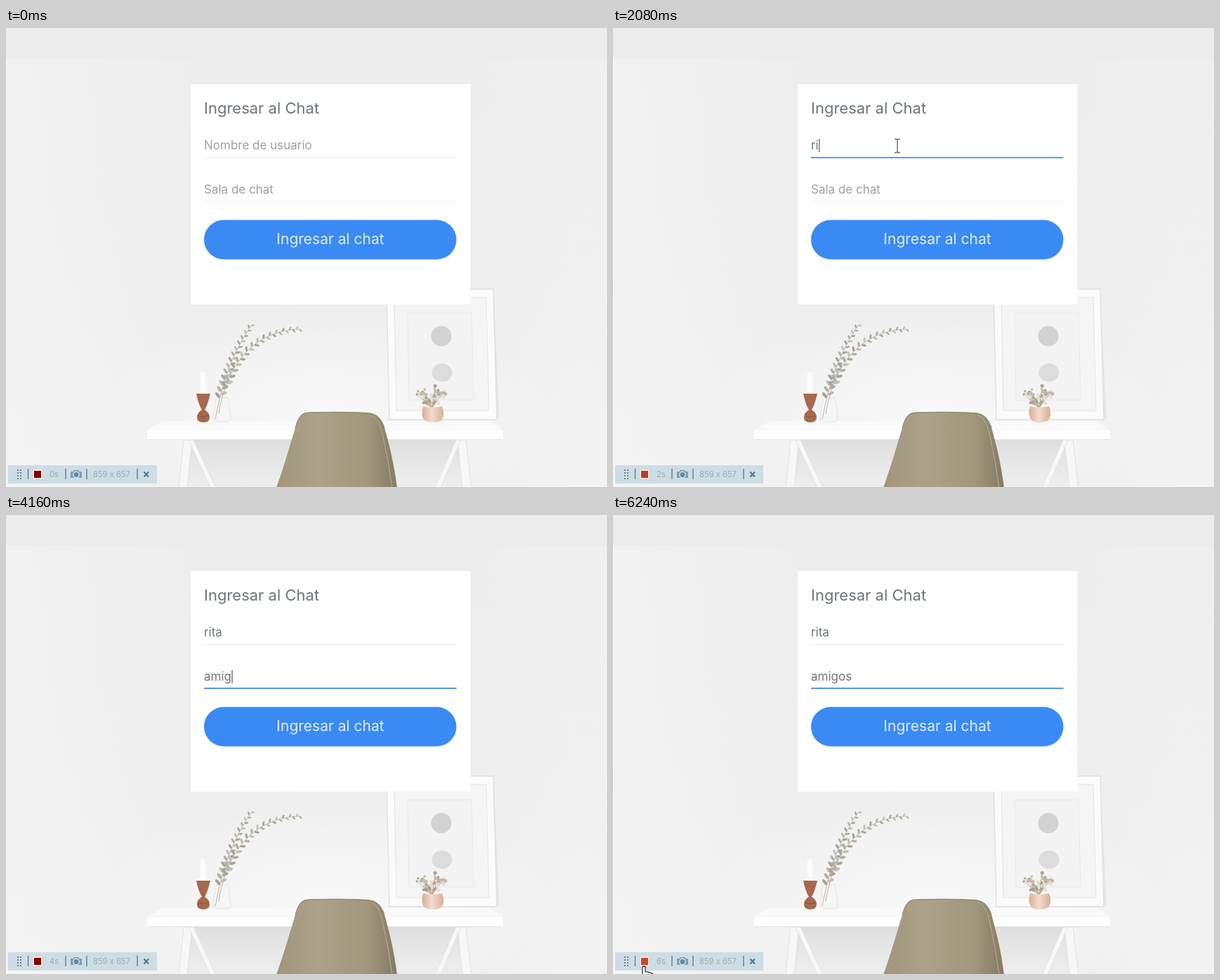
These frames come from a looping animation (856x654 px, 6.37 s). An HTML page:

```html
<!DOCTYPE html>
<html lang="es">
<head>
<meta charset="utf-8">
<title>Ingresar al Chat</title>
<style>
  html, body { margin: 0; width: 100%; height: 100%; overflow: hidden; background: #ededed; }
  svg { display: block; width: 856px; height: 654px; }
  text { font-family: Inter, "Open Sans", sans-serif; white-space: pre; }
  .field { font-size: 17px; }
  .tool { font-size: 11.2px; fill: #9eabb3; }
</style>
</head>
<body>
<svg viewBox="0 0 856 654">
  <defs>
    <linearGradient id="wall" x1="0" y1="0" x2="0" y2="1">
      <stop offset="0" stop-color="#ededed"/>
      <stop offset=".5" stop-color="#eeeeee"/>
      <stop offset="1" stop-color="#f1f1f1"/>
    </linearGradient>
    <linearGradient id="shade">
      <stop offset="0" stop-color="#fff" stop-opacity=".25"/>
      <stop offset=".35" stop-color="#ebebeb" stop-opacity=".3"/>
      <stop offset=".8" stop-color="#ededed" stop-opacity=".3"/>
      <stop offset="1" stop-color="#fff" stop-opacity=".1"/>
    </linearGradient>
    <radialGradient id="glow">
      <stop offset="0" stop-color="#fff" stop-opacity=".6"/>
      <stop offset=".5" stop-color="#fff" stop-opacity=".35"/>
      <stop offset="1" stop-color="#fff" stop-opacity="0"/>
    </radialGradient>
    <linearGradient id="under" x1="0" y1="0" x2="0" y2="1">
      <stop offset="0" stop-color="#dedede"/>
      <stop offset=".5" stop-color="#e7e7e7"/>
      <stop offset="1" stop-color="#eeeeee"/>
    </linearGradient>
    <linearGradient id="seat">
      <stop offset="0" stop-color="#a0967c"/>
      <stop offset=".35" stop-color="#aba289"/>
      <stop offset=".75" stop-color="#a1977d"/>
      <stop offset="1" stop-color="#857b63"/>
    </linearGradient>
    <linearGradient id="copper">
      <stop offset="0" stop-color="#dcae94"/>
      <stop offset=".45" stop-color="#f2dccd"/>
      <stop offset="1" stop-color="#d9ae97"/>
    </linearGradient>
  </defs>

  <rect width="856" height="654" fill="#ececec"/>
  <rect y="44" width="856" height="610" fill="url(#wall)"/>
  <rect y="44" width="856" height="610" fill="url(#shade)"/>
  <ellipse cx="455" cy="550" rx="330" ry="150" fill="url(#glow)"/>

  <!-- framed print -->
  <path d="M694 372L703 556H699Z" fill="#e6e6e6"/>
  <path d="M542 372H694L699 558H546Z" fill="#fbfbfb" stroke="#e0e0e0" stroke-width="1.3"/>
  <path d="M553 384H684L688 545H556Z" fill="#f5f5f5" stroke="#e4e4e4"/>
  <path d="M572 406H663L666 530H574Z" fill="#f3f3f3" stroke="#e8e8e8"/>
  <circle cx="620" cy="439" r="14.5" fill="#d2d2d2"/>
  <ellipse cx="621" cy="491" rx="14.5" ry="13" fill="#dcdcdc"/>

  <!-- desk -->
  <path d="M253 586H655L663 655H246Z" fill="url(#under)"/>
  <g fill="#f7f7f7" stroke="#dcdcdc" stroke-width=".7">
    <path d="M253 587H265L258 655H246Z"/>
    <path d="M260 587H267L299 655H291Z"/>
    <path d="M643 587H655L663 655H650Z"/>
    <path d="M648 587H641L611 655H619Z"/>
  </g>
  <path d="M224 560H688L708 572H201Z" fill="#fafafa"/>
  <path d="M201 572H708V585L701 587H206L201 585Z" fill="#fefefe"/>
  <path d="M203 586.5H706" stroke="#e2e2e2"/>
  <path d="M201 572H708" stroke="#f1f1f1"/>

  <!-- plants, candle and pots -->
  <path d="M299 527H316L320 556Q320 561 314 561H300Q294 561 295 555Z" fill="#f6f6f6" stroke="#e3e3e3"/>
  <g id="plants"></g>
  <path d="M277 492Q280 487 284 492V521H277Z" fill="#fdfcfa"/>
  <path d="M271 521H291Q287 538 283 544Q290 548 290 555Q290 562 281 562Q272 562 272 555Q272 548 279 544Q274 536 271 521Z" fill="#a5694f"/>
  <path d="M274 552Q281 556 288 552" fill="none" stroke="#85503d"/>
  <path d="M594 539Q608 542 621 539Q625 549 622 556Q619 562 608 562Q597 562 594 556Q591 548 594 539Z" fill="url(#copper)"/>

  <!-- chair -->
  <path d="M385 655C397 622 405 592 412 570C416 555 420 548 432 547.5Q474 546 514 548C528 549 534 556 539 569C546 594 553 622 557 655Z" fill="url(#seat)"/>
  <path d="M412 570C416 555 420 548 432 548Q474 546.5 514 548.5C528 549 534 556 539 569" fill="none" stroke="#8b826b"/>
  <path d="M519 552C529 555 533 564 537 582Q545 618 550 655" fill="none" stroke="#b8b099" stroke-width="1"/>

  <!-- form -->
  <rect x="263" y="80" width="398.500" height="314" fill="#fff"/>
  <text x="282" y="122" font-size="22" fill="#6c757b">Ingresar al Chat</text>
  <path d="M282 184.500H641.500M282 247H641.500" stroke="#ececec"/>
  <g id="fields"></g>
  <rect id="caret" width="1.200" height="19" fill="#4f5a60"/>
  <rect x="283" y="275.500" width="358" height="55" rx="27.500" fill="#cfe2f9"/>
  <rect x="282" y="273.500" width="359.500" height="56" rx="28" fill="#3a8af4"/>
  <text x="462" y="308" font-size="21" fill="#e2edfd" text-anchor="middle">Ingresar al chat</text>

  <!-- recorder bar -->
  <rect id="bar" x="3" y="623" height="26" fill="#cddde4"/>
  <path d="M17 629V643M21 629V643" stroke="#688396" stroke-width="2" stroke-dasharray="2 2"/>
  <path d="M31.500 628V643" stroke="#5e7382" stroke-width="1.300"/>
  <rect x="37.500" y="628.500" width="15" height="15" fill="#efe9e4" stroke="#d8cfca"/>
  <rect id="record" x="40" y="631" width="10" height="10"/>
  <text id="seconds" class="tool" x="62" y="640"></text>
  <g id="tools">
    <path d="M85 628V643M115 628V643M187 628V643" stroke="#5e7382" stroke-width="1.300"/>
    <path d="M92 632H95.500L97 630H103L104.500 632H108V641H92Z" fill="#7d9db5"/>
    <circle cx="100" cy="636.500" r="4.200" fill="#6288a6" stroke="#d5e3e9" stroke-width="1.500"/>
    <text class="tool" x="124" y="640">859 x 657</text>
    <path d="M196.500 632.500L203 639.500M203 632.500L196.500 639.500" stroke="#52799b" stroke-width="2.300"/>
  </g>

  <g id="cursor">
    <path id="beam" d="M-4-9.500H-1L0-8.500L1-9.500H4M0-8.500V8.500M-4 9.500H-1L0 8.500L1 9.500H4" fill="none" stroke="#666" stroke-width="1.300"/>
    <path id="arrow" d="M0 0V18L4.200 14L7.500 21L10.500 19.700L7.200 13H13Z" fill="#111" stroke="#fff"/>
    <path id="hand" d="M-2 1Q0-1 2 1V8H4Q6 7 7 9Q9 8 10 10Q12 9 13 12V18L10 24H0L-6 14Q-6 11-2 14Z" fill="#fff" stroke="#222" stroke-width="1.200"/>
  </g>
</svg>
<script>
const LOOP = 6370, STEP = 130;
const $ = id => document.getElementById(id);
const add = (parent, tag, attrs) => {
  const el = document.createElementNS('http://www.w3.org/2000/svg', tag);
  for (const key in attrs) el.setAttribute(key, attrs[key]);
  return parent.appendChild(el);
};
const set = (id, attrs) => { for (const key in attrs) $(id).setAttribute(key, attrs[key]); };
const show = (id, on) => $(id).setAttribute('visibility', on ? 'visible' : 'hidden');
const clamp = v => Math.max(0, Math.min(1, v));
const latest = (list, t) => list.filter(([at]) => at <= t).pop()[1];

let seed = 11;
const random = () => (seed = seed * 16807 % 2147483647) / 2147483647;

function branch(d, leaves, size) {
  const stem = add($('plants'), 'path', { d, fill: 'none', stroke: '#bbb4a9', 'stroke-width': 1 });
  const length = stem.getTotalLength();
  for (let i = 0; i < leaves; i++) {
    const s = .22 + .78 * i / (leaves - 1);
    const p = stem.getPointAtLength(s * length);
    const q = stem.getPointAtLength(s * length - 2);
    const angle = Math.atan2(p.y - q.y, p.x - q.x) * 180 / Math.PI;
    const side = i % 2 ? 1 : -1, r = size * (1.15 - .6 * s);
    add($('plants'), 'ellipse', {
      cx: r, rx: r, ry: r * .45, fill: ['#a8a39a', '#c3beb5', '#b4aea4'][i % 3],
      transform: `translate(${p.x} ${p.y}) rotate(${angle + side * 52})`
    });
  }
}

function flowers() {
  for (let i = 0; i < 48; i++) {
    const a = random() * Math.PI * 2, r = Math.sqrt(random());
    const x = 605 + Math.cos(a) * r * 21, y = 523 + Math.sin(a) * r * 14;
    if (i % 3 === 0) add($('plants'), 'path', { d: `M607 541L${x} ${y}`, stroke: '#b5ad96', 'stroke-width': .8 });
    add($('plants'), 'circle', { cx: x, cy: y, r: 1.2 + random() * 1.8, fill: ['#aaa48f', '#e6dfd5', '#c6bcac'][i % 3] });
  }
}

branch('M298 558C306 515 318 470 349 424', 26, 4.8);
branch('M303 550C312 490 345 432 418 429', 30, 4.6);
flowers();

const fields = [
  { hint: 'Nombre de usuario', y: 173, line: 184.7, focus: 1430, blur: 2730,
    typed: [[0, ''], [1820, 'r'], [2080, 'ri'], [2210, 'rit'], [2340, 'rita']] },
  { hint: 'Sala de chat', y: 236, line: 246.8, focus: 2730, blur: Infinity,
    typed: [[0, ''], [3770, 'a'], [4030, 'ami'], [4160, 'amig'], [4290, 'amigos']] }
];
for (const f of fields) {
  f.rule = add($('fields'), 'path', { d: `M282 ${f.line}H641.5`, stroke: '#3d87ea', 'stroke-width': 1.8 });
  f.text = add($('fields'), 'text', { class: 'field', x: 282, y: f.y });
}

const caretOn = [[0, false], [1430, true], [3380, false], [3770, true], [4940, false], [5460, true], [5980, false]];
const recordColor = [[0, '#820000'], [1560, '#bf3a2b'], [2600, '#820000'], [4420, '#a3180f'], [5200, '#b83c36'], [5980, '#c8472e']];

// time, x, y
const pointer = [[0, 42, 690], [130, 42, 655], [910, 405, 168], [5070, 405, 168], [5720, 90, 598], [6240, 44, 643], [LOOP, 44, 643]];

function pointerAt(t) {
  const i = pointer.findIndex(p => p[0] > t);
  const [t0, x0, y0] = pointer[i - 1], [t1, x1, y1] = pointer[i];
  const k = (t - t0) / (t1 - t0), e = k * k * (3 - 2 * k);
  return [x0 + (x1 - x0) * e, y0 + (y1 - y0) * e];
}

function drawFields(t) {
  for (const f of fields) {
    const value = latest(f.typed, t);
    f.text.textContent = value || f.hint;
    f.text.setAttribute('fill', value ? '#6b777d' : '#9ba2a3');
    f.rule.setAttribute('opacity', clamp((t - f.focus + STEP) / 260) * (1 - clamp((t - f.blur + STEP) / 260)));
    if (t >= f.focus && t < f.blur) {
      const width = value ? f.text.getComputedTextLength() : 0;
      set('caret', { x: 282.5 + width, y: f.y - 15 });
    }
  }
  show('caret', latest(caretOn, t));
}

function drawRecorder(t) {
  const s = Math.floor(t / 1000);
  const shift = s === 1 ? -4 : s % 4 ? -1 : 0;
  $('seconds').textContent = s + 's';
  set('bar', { width: 212 + shift });
  set('tools', { transform: `translate(${shift} 0)` });
  set('record', { fill: latest(recordColor, t) });
}

function drawPointer(t) {
  const [x, y] = pointerAt(t);
  const visible = t < 2730 || t > 5070;
  const beam = x > 282 && y > 150 && y < 186;
  const hand = t >= 6110;
  set('cursor', { transform: `translate(${x} ${y})` });
  show('beam', visible && beam);
  show('hand', visible && hand);
  show('arrow', visible && !beam && !hand);
}

function render(now) {
  const t = Math.floor(now % LOOP / STEP) * STEP;
  drawFields(t);
  drawRecorder(t);
  drawPointer(t);
}

const start = performance.now();
(function tick() {
  render(performance.now() - start);
  requestAnimationFrame(tick);
})();
</script>
</body>
</html>
```
